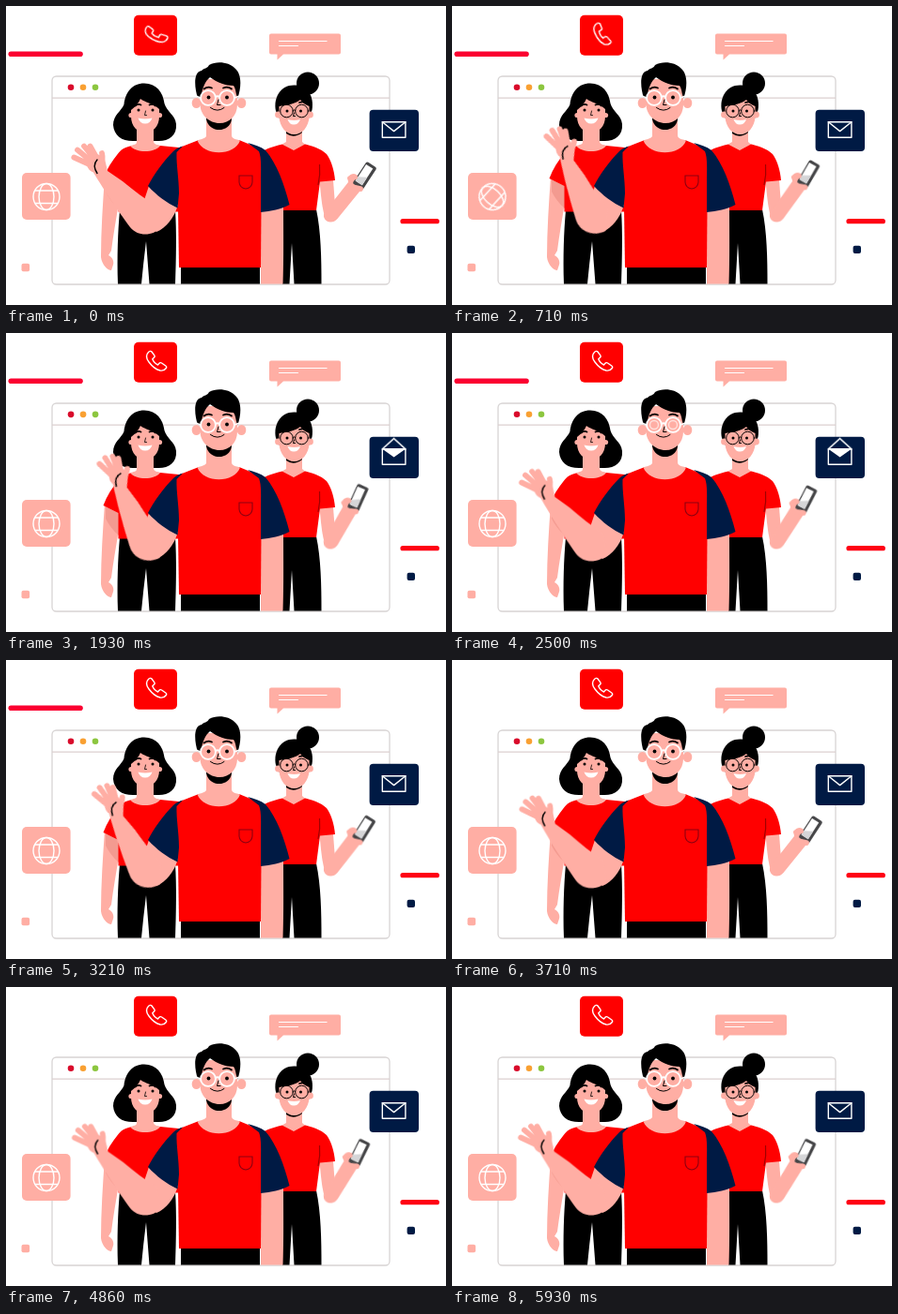
An HTML page without scripts that plays this animation: 468 px wide and 319 px high, repeating every 6000 ms.

```html
<!DOCTYPE html>
<html lang="en">
<head>
<meta charset="utf-8">
<title>Support team</title>
<style>
html, body { margin: 0; width: 100%; height: 100%; overflow: hidden; background: #fff; }
svg { display: block; width: 468px; height: 319px; }
.skin { fill: #ffaea4; }
.red { fill: #f00; }
.navy { fill: #001a44; }
.ink { fill: #000; }
.white { fill: #fff; }
.line { fill: none; stroke: #fff; stroke-width: 1.4; stroke-linejoin: round; stroke-linecap: round; }
.thin { fill: none; stroke: #000; stroke-width: 1; stroke-linecap: round; }
.brow { fill: none; stroke: #000; stroke-width: 1.7; stroke-linecap: round; }
.finger { fill: none; stroke: #ffaea4; stroke-linecap: round; stroke-width: 5.8; }

.wave { transform-origin: 152.5px 233px; animation: wave .6s cubic-bezier(.37,0,.63,1) infinite alternate; }
.hold { transform-origin: 345px 224px; animation: hold 6s cubic-bezier(.37,0,.63,1) infinite; }
.ring { transform-origin: 160px 30.5px; animation: ring 6s ease-in-out infinite; }
.globe { transform-origin: 43px 203.5px; animation: spin 6s linear infinite; }
.flap { transform-origin: 412px 123.8px; animation: flap 6s ease-in-out infinite; }
.letter { animation: letter 6s step-end infinite; }
.dot { transform-box: fill-box; transform-origin: center; animation: pulse 6s ease-in-out infinite; }
.eyes { transform-origin: 225px 98px; animation: blink 6s ease-in-out infinite; }
.lids { animation: lids 6s step-end infinite; }
.dash { animation: dash 6s step-end infinite; }

@keyframes wave { to { transform: rotate(21deg); } }
@keyframes hold {
  0%, 60% { transform: none; }
  30% { transform: rotate(-9deg); }
  90% { transform: rotate(-9deg); animation-timing-function: cubic-bezier(.33,0,.67,.33); }
  100% { transform: rotate(-6.75deg); }
}
@keyframes ring {
  0%, 8%, 16% { transform: rotate(-17deg); }
  4%, 12% { transform: rotate(13deg); }
  21%, 100% { transform: none; }
}
@keyframes spin { 0% { transform: none; } 32.2%, 100% { transform: rotate(360deg); } }
@keyframes flap {
  0%, 15%, 47%, 100% { transform: none; }
  20%, 42.4% { transform: scaleY(-1.15); }
}
@keyframes letter { 0% { opacity: 0; } 17.5% { opacity: 1; } 44.5% { opacity: 0; } }
@keyframes pulse { 0%, 14%, 34%, 100% { transform: none; } 22%, 25% { transform: scale(1.16); } }
@keyframes blink { 0%, 39.5%, 44.5%, 100% { transform: none; } 40.8%, 43% { transform: scaleY(0); } }
@keyframes lids { 0% { opacity: 0; } 40.6% { opacity: 1; } 43.2% { opacity: 0; } }
@keyframes dash { 0% { opacity: 1; } 59.5% { opacity: 0; } }
</style>
</head>
<body>
<svg viewBox="0 0 468 319">
  <!-- window -->
  <rect x="49" y="75" width="359" height="222" rx="4.5" fill="#fff" stroke="#d8d4d4" stroke-width="1.3"/>
  <path d="M49 98.2H408" stroke="#dccfcf" stroke-width="1.2"/>
  <circle class="dot" cx="69" cy="86.8" r="3.3" fill="#d90b2b"/>
  <circle class="dot" cx="82" cy="86.8" r="3.3" fill="#f9a032"/>
  <circle class="dot" cx="95" cy="86.8" r="3.3" fill="#8cc63f"/>

  <!-- accents -->
  <path class="dash" d="M5.3 51.3H79" stroke="#fb0030" stroke-width="5.6" stroke-linecap="round"/>
  <path d="M422 229.7H458.3" stroke="#ff0014" stroke-width="5.2" stroke-linecap="round"/>
  <rect class="skin" x="16.5" y="274.8" width="8.6" height="8.4" rx="2"/>
  <rect class="navy" x="426.6" y="255.8" width="8.4" height="8.2" rx="2"/>

  <!-- speech bubble -->
  <path class="skin" d="M282 29.5H354Q356 29.5 356 31.5V49.5Q356 51.5 354 51.5H295L288.5 57.5V51.5H282Q280 51.5 280 49.5V31.5Q280 29.5 282 29.5Z"/>
  <path d="M290 37.5H341.5M290 42.5H311" stroke="#fff" stroke-width="1.1"/>

  <!-- call -->
  <rect class="red" x="136" y="9.7" width="46" height="43" rx="5"/>
  <path class="ring line" d="M151.5 20.5C149 23 149 27 152 31C155 35 159 39 164 40C167 40.5 169 39.5 170.3 37.5C171 36.5 170.5 35.5 169.8 35L165.5 32C164.5 31.4 163.5 31.6 162.8 32.5L161.5 34C158.5 32.5 156.5 30 155.8 27.8L157.4 26.3C158.2 25.6 158.3 24.6 157.8 23.8L155 20C154.2 19 152.6 19.2 151.5 20.5Z"/>

  <!-- globe -->
  <rect class="skin" x="17" y="178" width="51.6" height="50" rx="5"/>
  <g class="globe line">
    <circle cx="43" cy="203.5" r="14"/>
    <ellipse cx="43" cy="203.5" rx="8" ry="14"/>
    <path d="M31 197H55M31 210.5H55"/>
  </g>

  <!-- mail -->
  <rect class="navy" x="386.6" y="110.7" width="52.4" height="44.3" rx="4"/>
  <rect class="line" x="400.3" y="123.8" width="24.6" height="16.4"/>
  <path class="letter white" d="M400.3 123.8H424.9L412.6 132.5Z"/>
  <path class="flap line" d="M400.3 123.8L412.6 133.6L424.9 123.8"/>

  <!-- left teammate -->
  <g>
    <path class="ink" d="M147 82.5C134 82.5 127 92 125.5 105C123 112 114 116 114 127C115 139 124 145 138 144H160C172 145 182 139 181 126C180 116 171 113 168.5 104C167 92 160 82.5 147 82.5Z"/>
    <path class="skin" d="M105 182L120 187V210C117 228 114 245 112 261L109 266C114 268 115 274 114 276L112 282C108 282 102 276 101 268C101 240 103 210 105 182Z"/>
    <path d="M106 186L120 188V216C114 211 109 204 106 198Z" fill="#f39a90"/>
    <path class="ink" d="M121 218H180C181.5 240 181 270 180 296.5H152.5L149 251Q146 275 144 296.5H119C118 268 119 240 121 218Z"/>
    <path class="red" d="M137 148.5C130 150 124 151 119.5 157C113 165 107 174 103.5 184L119.5 192V219.5H184V151L159 148.5Z"/>
    <path class="skin" d="M139 126H157V145C158 148 161 148 164 149C158 157 138 157 132 149C136 148 139 148 139 145Z"/>
    <path class="skin" d="M133 111C137 108 141 104 143 99C148 103 157 104 163 110V118C163 128 156 135.5 148 135.5C140 135.5 133 128 133 118Z"/>
    <circle class="skin" cx="133" cy="116.5" r="2.6"/><circle class="skin" cx="163.500" cy="116.5" r="2.6"/>
    <circle class="ink" cx="141" cy="111" r="1.5"/><circle class="ink" cx="156" cy="111" r="1.5"/>
    <path class="brow" d="M137.500 106.500Q140.500 104 143.500 105.500M152.500 105.500Q156 104 159 106.500"/>
    <path class="thin" stroke-opacity=".8" d="M148.500 112L147.500 116.500H149.500"/>
    <path class="white" d="M140.500 119.500Q148 121.500 155.500 119.500Q153.500 125.500 148 125.500Q142.500 125.500 140.500 119.500Z"/>
  </g>

  <!-- right teammate -->
  <g>
    <path class="ink" d="M294 217H330C335 240 335.500 270 335.500 296.500H306.500L304 253L301.500 296.500H294Z"/>
    <path class="skin" d="M333.500 186H348L350 212C349 222 345 229 340 226C337 222 335 204 333.500 186Z"/>
    <g class="hold">
      <path class="skin" d="M342 216L364 188C363 183 365 179 370 179L381 184C384 188 382 195 376 198L352.500 227C348 232.500 340 231.500 338 225C337.500 221 339 219 342 216Z"/>
      <g transform="translate(381.500 181) rotate(33)">
        <rect x="-6.500" y="-14" width="13" height="28" rx="2" fill="#454547"/>
        <rect class="white" x="-5.300" y="-11" width="8.600" height="21"/>
        <path d="M-5.300 10V5L3.300 0V10Z" fill="#d5d5d7"/>
      </g>
      <path class="finger" stroke-width="4" d="M366 184L371 182.500M368 193L377 195"/>
    </g>
    <path class="red" d="M296 147C288 149 278 151 272 156V218H330L334 187.500L350 186C349 175 346 165 341 158C335 152 325 149 316 147Z"/>
    <path d="M333.500 169Q334.500 180 332 191" fill="none" stroke="#a00000" stroke-width="1.2"/>
    <circle class="ink" cx="321" cy="82.500" r="12"/>
    <path class="ink" d="M287 112C284 98 292 84.500 306 84.500C320 84.500 328 95 325.500 111L322 120H291Z"/>
    <path class="skin" d="M298 128H315V145L318 147.500L306 154L293.500 147.500L298 145Z"/>
    <path class="ink" d="M298 133Q306 140 315 133V135Q306 142 298 136Z"/>
    <circle class="skin" cx="289.500" cy="116" r="3.400"/><circle class="skin" cx="323.500" cy="116" r="3.400"/>
    <path class="skin" d="M290.500 107C299 106 308 104 313 100C316 104 320 106 322.500 107V118C322 129 315 137 306.500 137C298 137 291 129 290.500 118Z"/>
    <g class="thin"><circle cx="298.500" cy="112" r="6.800"/><circle cx="314.500" cy="112" r="6.800"/><path d="M305.300 111.500Q306.500 110 307.700 111.500M306.500 114L305.500 117.500H307.500"/></g>
    <path class="brow" d="M294 103.500Q298 101.500 301 103M312 103Q316 101.500 319 103.500"/>
    <circle class="ink" cx="299" cy="112" r="1.500"/><circle class="ink" cx="313.500" cy="112" r="1.500"/>
    <path class="white" d="M299.500 121Q306.500 123 313 121Q311 126.500 306 126.500Q301.500 126.500 299.500 121Z"/>
  </g>

  <!-- lead -->
  <g>
    <path class="skin" d="M271 214L295 212C295 240 295.500 270 294.500 296.500H271Z"/>
    <path class="ink" d="M186 278H270V296.500H186Z"/>
    <path class="skin" d="M152 192L183 212C179 226 170 237 160 241L145 228L147 207Z"/>
    <g class="wave">
      <path class="skin" d="M90 172C96 184 118 217 132 236C140 246 156 246 165 236L160 213C148 206 136 197 124 187L108 176L105 163L94 160Z"/>
      <ellipse class="skin" cx="95.500" cy="168" rx="9.500" ry="10"/>
      <path class="finger" d="M91 170L72.300 161.500M91 166L76 153.500M94 163L83 149.500M97 163L89.500 149.500"/>
      <path class="finger" d="M101 170Q103.500 163 102 157"/>
      <path class="thin" style="stroke-width:1.400" d="M97 164Q91.500 170 97 178.500"/>
    </g>
    <path class="red" d="M205 143L182 152L184 279H271L272 153L248 143Z"/>
    <path class="navy" d="M188 149.500C184 151 181 152 178 155C167 166 157 180 151 192C160 202 171 210 182.500 215.500L184 200C184 184 181 170 181.500 156Z"/>
    <path class="navy" d="M257 146C264 148 271 150 276 154C288 168 296 190 301.500 212C292 217 282 219 271 220V190C271 175 272 162 269 155Z"/>
    <path d="M248 181H262V188Q261.500 194 255 195Q248.500 194 248 188Z" fill="none" stroke="#8d0010" stroke-width="1.1"/>

    <path class="skin" d="M213 112V139C211 142 207 142 203.500 143.500C210 160.500 243 160.500 249 143.500C245 142 240 142 240 138V112Z"/>
    <path class="ink" d="M213 117H240V121C238 135.500 216 136 213 121Z"/>
    <ellipse class="skin" cx="202.500" cy="103.500" rx="4.800" ry="5.500"/><ellipse class="skin" cx="250.500" cy="103.500" rx="4.800" ry="5.500"/>
    <path class="skin" d="M206.500 78H246V105C246 117 238 125 227 125C216 125 206.500 116 206.500 105Z"/>
    <path class="ink" d="M204 98C200 86 199.500 70 208 69C211 66 214 67 216 63C224 58 238 60 243 66C251 72 250.500 86 246.500 98C244 94 245 89 242 85C234 85 225 82 217 76C212 80 209 87 207.500 97Z"/>
    <g class="eyes ink"><circle cx="215.500" cy="97.500" r="1.900"/><circle cx="235" cy="97.500" r="1.900"/></g>
    <g class="lids line" stroke-opacity=".6"><circle cx="215" cy="98" r="4.500"/><circle cx="235" cy="98" r="4.500"/></g>
    <g class="line" style="stroke-width:1.800"><circle cx="215" cy="98" r="7.900"/><circle cx="235" cy="98" r="7.900"/><path d="M222.900 97Q225 95.500 227.100 97M207.100 98L203 96.500M242.900 98L247 96.500"/></g>
    <path class="brow" d="M210.500 88.500Q214.500 85.500 219 87.500M231 87.500Q236 85.500 240 88.500"/>
    <path class="thin" d="M226 100L224.500 105.500H228M217.500 108.500Q225 114 232 108.500"/>
  </g>
</svg>
</body>
</html>
```
